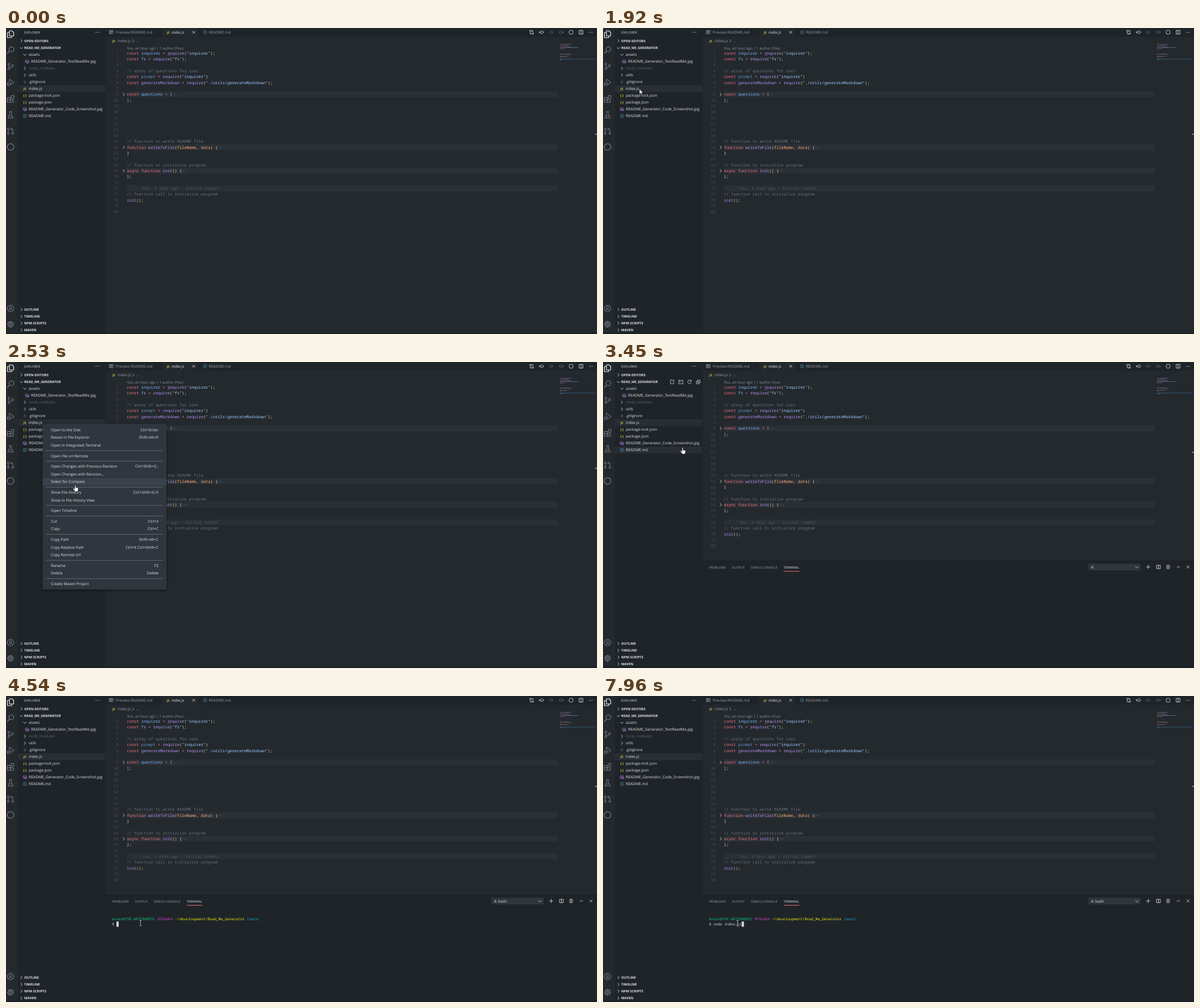
Recreate the animation shown at these times as an HTML page with a canvas. Size 1039x539 px, loop 8 s.

```html
<!DOCTYPE html>
<html lang="en">
<head>
<meta charset="utf-8">
<title>Editor session</title>
<style>
html, body { margin: 0; width: 100%; height: 100%; overflow: hidden; background: #24292e; }
canvas { display: block; width: 1039px; height: 539px; }
</style>
</head>
<body>
<canvas id="stage"></canvas>
<script>
const W = 1039, H = 539, LOOP = 8000;
const UI = '"Open Sans", "Noto Sans", sans-serif';
const MONO = '"Noto Sans Mono", "DejaVu Sans Mono", monospace';
const dpr = window.devicePixelRatio || 1;
const col = {
  bg: '#24292e', side: '#1f2428', edge: '#1b1f23', row: '#282e34', line: '#2b3036',
  text: '#e1e4e8', soft: '#d1d5da', grey: '#959da5', dim: '#6a737d', faint: '#444d56',
  menu: '#2f363d', pick: '#39424b', blue: '#519aba', yellow: '#cbcb41', purple: '#a074c4'
};
const CODE = { k: '#f97583', v: '#79b8ff', u: '#6196c4', f: '#b392f0', s: '#9ecbff',
  p: '#ffab70', b: '#e8d77a', w: '#e1e4e8', c: '#6a737d' };

let c;

function makeLayer(canvas) {
  canvas.width = W * dpr;
  canvas.height = H * dpr;
  const ctx = canvas.getContext('2d');
  ctx.scale(dpr, dpr);
  ctx.textRendering = 'geometricPrecision';
  return ctx;
}

function rect(x, y, w, h, fill) {
  c.fillStyle = fill;
  c.fillRect(x, y, w, h);
}

// y is the middle of the capitals
function text(s, x, y, fill = col.text, size = 6.7, style = '', family = UI, align = 'left') {
  c.font = `${style} ${size}px ${family}`;
  c.textAlign = align;
  c.fillStyle = fill;
  c.fillText(s, x, y + size * 0.357);
}

const mono = (s, x, y, fill, size = 7, align) => text(s, x, y, fill, size, '', MONO, align);

function icon(x, y, d, color = col.soft, w = 0.9, fill) {
  const p = new Path2D(d);
  c.save();
  c.translate(x, y);
  if (fill) { c.fillStyle = fill; c.fill(p); }
  c.strokeStyle = color;
  c.lineWidth = w;
  c.lineJoin = 'round';
  c.stroke(p);
  c.restore();
}

const ring = (x, y, r) => `M${x + r} ${y}A${r} ${r} 0 1 1 ${x - r} ${y}A${r} ${r} 0 1 1 ${x + r} ${y}`;
const right = (x, y, color = col.soft) => icon(x, y, 'M-1.3-2.6L1.4 0L-1.3 2.6', color);
const down = (x, y, color = col.soft) => icon(x, y, 'M-2.6-1.3L0 1.4L2.6-1.3', color);

function dots(x, y, color = col.soft, gap = 2.6, size = 1.1) {
  for (const i of [-1, 0, 1]) rect(x + i * gap - size / 2, y - size / 2, size, size, color);
}

function info(x, y) {
  icon(x, y, ring(0, 0, 2.9), col.blue, 0.7);
  rect(x - 0.4, y - 0.5, 0.8, 2.2, col.blue);
  rect(x - 0.4, y - 1.8, 0.8, 0.8, col.blue);
}

const js = (x, y) => text('JS', x, y, col.yellow, 5.4, 'bold', UI, 'center');
const braces = (x, y) => text('{ }', x, y - 0.3, col.yellow, 5.8, 'bold', UI, 'center');
const image = (x, y) => icon(x, y, 'M-3-2.3H1.8V1.3H-3Z M-1.5 1.3V2.6H3V-0.8H1.8 M-2.4 1L-1 -.7L.2 .5L1 0', col.purple, 0.8);
const diamond = (x, y) => icon(x, y, 'M0-2.4L2.4 0L0 2.4L-2.4 0Z M-.8 0H.8', '#59646d', 0.9);

const files = [
  ['assets', 40, down], ['README_Generator_TestReadMe.jpg', 44, image],
  ['node_modules', 40, right, '#5d666f'], ['utils', 40, right], ['.gitignore', 40, diamond],
  ['index.js', 40, js], ['package-lock.json', 40, braces], ['package.json', 40, braces],
  ['README_Generator_Code_Screenshot.jpg', 40, image], ['README.md', 40, info]
];
const ROW0 = 47, ROW = 12;

// [line number, coloured pieces]; the first letter of a piece picks its colour
const code = [
  [1, 'kconst ', 'vinquirer ', 'k= ', 'frequire', 'b(', 's"inquirer"', 'b)', 'w;'],
  [2, 'kconst ', 'vfs ', 'k= ', 'frequire', 'b(', 's"fs"', 'b)', 'w;'],
  [3],
  [4, 'c// array of questions for user'],
  [5, 'kconst ', 'uprompt ', 'k= ', 'frequire', 'b(', 's"inquirer"', 'b)'],
  [6, 'kconst ', 'fgenerateMarkdown ', 'k= ', 'frequire', 'b(', 's"./utils/generateMarkdown"', 'b)', 'w;'],
  [7],
  [8, 'kconst ', 'vquestions ', 'k= ', 's['],
  [48, 's]', 'w;'],
  [49], [50], [51], [52], [53], [54],
  [55, 'c// function to write README file'],
  [56, 'kfunction ', 'fwriteToFile', 'b(', 'pfileName', 'w, ', 'pdata', 'b) ', 'w{'],
  [62, 'w}'],
  [63],
  [64, 'c// function to initialize program'],
  [65, 'kasync function ', 'finit', 'b() ', 'w{'],
  [74, 'w};'],
  [75], [76],
  [77, 'c// function call to initialize program'],
  [78, 'finit', 'b()', 'w;'],
  [79], [80]
];
const folded = [8, 56, 65];
const CODE_X = 212.5, CODE_Y = 44.5, PITCH = 10.35, CHAR = 4.2;

function drawActivityBar() {
  const g = '#7d868f';
  icon(8, 11, 'M-2-6H2.5L5.5-3V3H-2Z M-2-3H-5.5V6H2V3', '#f2f4f6', 1.1);
  icon(8, 39, ring(1.5, -1.5, 4.2) + 'M-1.5 1.5L-5.8 6', g, 1.1);
  icon(8, 67.5, ring(-3, -4, 1.7) + ring(-3, 4.3, 1.7) + ring(3.5, -1.5, 1.7) + 'M-3-2.3V2.6M3.5 .2C3.5 2.5-1 1-2.5 2.7', g);
  icon(8, 96, 'M-2-1V-6L6 0L1 3.6' + ring(-2.5, 3, 2.4) + 'M-6 .5L-4.5 1.7M-6.4 3H-5M-6 6L-4.4 4.7M1 .5L-.4 1.7', g, 1);
  icon(8, 125, 'M-5.8-2.5H-.3V5.8H-5.8ZM-5.8 1.5H5V5.8H-.3M-.3 1.5H5M1.2-6H5.8V-1.2H1.2Z', g, 1);
  icon(8, 153, 'M-2.4-5.7H2.4M-1.4-5.7V-1.5L-4.8 5.5H4.8L1.4-1.5V-5.7M-3 2H3', g);
  icon(8, 181.5, ring(-4, -4, 1.6) + ring(-4, 4.3, 1.6) + ring(4, 4.3, 1.6) + 'M-4-2.4V2.7M4 2.7V-3.5H.3M2-5.5L0-3.5L2-1.5', g);
  icon(8, 209.5, ring(0, 0, 5.8), g, 1.1);
  icon(8, 494, ring(0, 0, 5.8) + ring(0, -1.2, 2.2) + 'M-3.8 4.3C-3 .8 3 .8 3.8 4.3', g);
  let gear = ring(0, 0, 1.9) + ring(0, 0, 4.4);
  for (let i = 0; i < 8; i++) {
    const a = i * Math.PI / 4, x = Math.cos(a), y = Math.sin(a);
    gear += `M${x * 4.4} ${y * 4.4}L${x * 6} ${y * 6}`;
  }
  icon(8, 522, gear, g, 1.1);
}

function drawSidebar() {
  rect(21, 0, 154.5, H, col.side);
  text('EXPLORER', 32, 7.5, col.soft, 5.8);
  dots(160.5, 7.5);
  const section = (s, y, mark = right) => {
    mark(27, y);
    text(s, 32, y, col.text, 5.9, 'bold');
  };
  section('OPEN EDITORS', 22.7);
  section('READ_ME_GENERATOR', 35.2, down);
  ['OUTLINE', 'TIMELINE', 'NPM SCRIPTS', 'MAVEN'].forEach((s, i) => section(s, 496 + i * 12));
}

function drawFiles(hover) {
  files.forEach(([name, x, mark, color], i) => {
    const y = ROW0 + i * ROW;
    if (i === 5 || i === hover) rect(21, y - 6, 153.5, ROW, col.row);
    mark(x - 6.8, y);
    text(name, x, y, color);
  });
}

function drawTabs() {
  rect(175.5, 0, W - 175.5, 15.5, col.side);
  rect(273.5, 0, 64.5, 15.5, col.bg);
  for (const x of [273, 338, 405]) rect(x, 0, 0.6, 15.5, col.edge);
  icon(185, 7.3, 'M-3.2-2.8H3.2V2.8H-3.2ZM0-2.8V2.8M-3.2-1H3.2M-3.2 1H0', col.grey, 0.8);
  text('Preview README.md', 193, 7.7, col.grey);
  js(285, 7.7);
  text('index.js', 291, 7.7, col.text, 6.7, 'italic');
  icon(330, 7.5, 'M-2.2-2.2L2.2 2.2M2.2-2.2L-2.2 2.2', col.text);
  info(350, 7.5);
  text('README.md', 356.5, 7.7, col.grey);

  icon(924, 7.5, ring(-2.5, -2.6, 1.1) + ring(2.5, 2.6, 1.1) + 'M-2.5-1.4V2.6H.5M-1-3.5M2.5 1.4V-2.6H-.5M1-4L-.5-2.6L1-1.2M-1 1.2L.5 2.6L-1 4', col.soft, 0.8);
  icon(941.5, 7.5, ring(0.8, 0, 2.3) + 'M-1.5 0H-4.2M-2.4-2L-4.3 0L-2.4 2M3.1 0H4.3', col.soft, 0.8);
  icon(958.5, 7.5, ring(0, 0, 2.2) + 'M-4.2 0H-2.2M2.2 0H4.2', '#606971', 0.8);
  icon(976, 7.5, ring(-0.8, 0, 2.3) + 'M1.5 0H4.2M2.4-2L4.3 0L2.4 2M-3.1 0H-4.3', '#606971', 0.8);
  icon(993.5, 7.5, ring(0, 0, 3.6), col.soft);
  icon(1011, 7.5, 'M-3.3-3.3H3.3V3.3H-3.3ZM0-3.3V3.3', col.soft);
  dots(1028.5, 7.7);

  js(189.5, 23);
  text('index.js', 196, 23, col.grey);
  right(223.5, 23, col.grey);
  text('...', 228.5, 23, col.grey);
}

function drawCode() {
  text('You, an hour ago | 1 author (You)', CODE_X, 36, '#8b949c', 6.4);
  code.forEach(([num, ...parts], i) => {
    const y = CODE_Y + i * PITCH, my = 28.6 + i * 1.08;
    const isFold = folded.includes(num);
    if (isFold || num === 76) rect(CODE_X, y - 5.2, 757.5, PITCH, col.line);
    mono(String(num), 198, y, col.faint, 7, 'right');
    if (isFold) right(207, y);
    let n = 0;
    for (const part of parts) {
      const s = part.slice(1), color = CODE[part[0]];
      mono(s, CODE_X + n * CHAR, y, color);
      c.globalAlpha = 0.5;
      rect(974 + n * 0.54, my, s.trimEnd().length * 0.54, 0.75, color);
      c.globalAlpha = 1;
      n += s.length;
    }
    if (isFold) dots(CODE_X + n * CHAR + 4.8, y + 0.4, '#7b848d', 2.4, 0.9);
    if (num === 76) mono('You, 3 days ago \u2022 initial commit', 239.7, y, '#50585f');
  });
  dots(286.5, 48.6, col.grey, 2, 0.8);
  rect(974, 54.2, 62, 0.9, '#31567a');
}

function drawPanel(ready, typed) {
  rect(175.5, 350.5, W - 175.5, 186.5, col.side);
  rect(175.5, 350, W - 175.5, 0.7, col.edge);
  [['PROBLEMS', 186.5], ['OUTPUT', 226.5], ['DEBUG CONSOLE', 260], ['TERMINAL', 317.5]].forEach(([s, x], i) =>
    text(s, x, 361.5, i === 3 ? col.text : col.grey, 5.7));
  rect(317.5, 368.3, 28, 0.9, '#f97583');
  rect(853.5, 355.3, 91.5, 11.7, col.menu);
  text(ready ? '4: bash' : '4:', 858, 361.4);
  down(938.5, 361.5);
  icon(958.5, 361, 'M-3.6 0H3.6M0-3.6V3.6');
  icon(976.5, 361, 'M-3.3-3H3.3V3H-3.3ZM0-3V3');
  icon(993.5, 361, 'M-3-2.2H3M-1-2.2V-3.3H1V-2.2M-2.3-2.2V3.2H2.3V-2.2M-.8-.8V2M.8-.8V2', '#d9b9c2', 0.8);
  icon(1011.5, 361, 'M-2.6 1.3L0-1.4L2.6 1.3');
  icon(1028.5, 361, 'M-2.4-2.4L2.4 2.4M2.4-2.4L-2.4 2.4');
  if (!ready) return;

  const x0 = 186.5, cw = 3.82, size = cw / 0.6;
  let n = 0;
  for (const [s, color] of [['mvarn@THE-WATERWHEEL ', '#0dbc79'], ['MINGW64 ', '#bc3fbc'],
    ['~/develoupment/Read_Me_Generator ', '#e5e510'], ['(main)', '#11a8cd']]) {
    mono(s, x0 + n * cw, 392.3, color, size);
    n += s.length;
  }
  mono('$ ' + typed, x0, 401.6, col.soft, size);
  rect(x0 + (2 + typed.length) * cw, 397.2, 4, 9.3, '#d1d5da');
}

function drawHeaderActions() {
  icon(121.5, 35, 'M.5-3.4H-2.8V3.4H2.8V-.5M.8-2.2H4M2.4-3.8V-.6', col.soft, 0.8);
  icon(137, 35, 'M.5-2.3H-.8L-1.6-3H-3.8V3.2H3.6V-.4M-3.8-1H.5M1.2-2.2H4.2M2.7-3.8V-.7', col.soft, 0.8);
  icon(152, 35, 'M2.8-1.6A3.1 3.1 0 1 0 3.1.8M3.2-3.6V-1.4H.9', col.soft, 0.9);
  icon(167.5, 35, 'M-3.4-.9H1.2V3.4H-3.4ZM-1.6-.9V-3.2H3.4V1.6H1.2M-2.2 1.3H0', col.soft, 0.8);
}

const menuGroups = [
  [['Open to the Side', 'Ctrl+Enter'], ['Reveal in File Explorer', 'Shift+Alt+R'], ['Open in Integrated Terminal']],
  [['Open File on Remote']],
  [['Open Changes with Previous Revision', 'Ctrl+Shift+G ,'], ['Open Changes with Revision...'], ['Select for Compare']],
  [['Show File History', 'Ctrl+Shift+G H'], ['Show in File History View']],
  [['Open Timeline']],
  [['Cut', 'Ctrl+X'], ['Copy', 'Ctrl+C']],
  [['Copy Path', 'Shift+Alt+C'], ['Copy Relative Path', 'Ctrl+K Ctrl+Shift+C'], ['Copy Remote Url']],
  [['Rename', 'F2'], ['Delete', 'Delete']],
  [['Create Maven Project']]
];

function drawMenu(my) {
  c.save();
  c.shadowColor = 'rgba(0,0,0,.6)';
  c.shadowBlur = 5 * dpr;
  c.shadowOffsetY = dpr;
  rect(64.5, 108.8, 217.5, 292, col.menu);
  c.restore();
  let y = 119.5;
  menuGroups.forEach((group, g) => {
    if (g) {
      rect(70, y - 9.6, 206, 0.8, '#6b7178');
    }
    for (const [label, keys] of group) {
      if (Math.abs(my - y) < 6.8) rect(64.5, y - 6.5, 217.5, 13, col.pick);
      text(label, 79, y);
      if (keys) text(keys, 268, y, col.text, 6.7, '', UI, 'right');
      y += 13.6;
    }
    y += 5;
  });
}

const ease = {
  line: u => u,
  both: u => u * u * (3 - 2 * u),
  out: u => 1 - (1 - u) ** 2.2
};
// [tick, x, y, easing towards this point]
const path = [
  [1, 985, 535], [11, 82, 165, 'out'], [22, 64, 107.5, 'both'], [28, 64, 107.5, 'line'],
  [33, 122, 217, 'both'], [35, 131, 239, 'out'], [39, 140, 161.5, 'both'], [43, 140, 151, 'both'],
  [46, 140, 151, 'line'], [55, 237.3, 400, 'both'], [56, 236.5, 400, 'line']
];

function pointerAt(k) {
  const i = path.findIndex(p => p[0] >= k);
  if (i < 0) return path[path.length - 1].slice(1, 3);
  if (i === 0) return path[0].slice(1, 3);
  const a = path[i - 1], b = path[i];
  const u = ease[b[3]]((k - a[0]) / (b[0] - a[0]));
  return [a[1] + (b[1] - a[1]) * u, a[2] + (b[2] - a[2]) * u];
}

const pointers = {
  arrow: (x, y) => icon(x, y, 'M0 0V9L2.1 7.1L3.6 10.4L5.1 9.7L3.6 6.5H6.4Z', '#15181b', 0.6, '#fff'),
  hand: (x, y) => icon(x, y, 'M-1 .8C-1-.3.7-.3.7.8V4L4 4.7C5 5 5.2 5.5 5.1 6.3L4.4 9V11H-1.4V9.4L-4 6.6C-4.3 5.5-3 5-2.3 5.7L-1 7Z', '#15181b', 0.5, '#fff'),
  beam: (x, y) => icon(x, y, 'M-2-4.7H-.6L0-4.2L.6-4.7H2M0-4.2V4.2M-2 4.7H-.6L0 4.2L.6 4.7H2', '#c9cdd2', 0.8)
};

const keyTimes = [5400, 5550, 5700, 5870, 6020, 6250, 6420, 6495, 6570, 6950, 7180, 7810, 7960];
const command = 'node index.js';

function render(t) {
  const k = Math.floor((t + 8) / 76.8);
  const [x, y] = pointerAt(k);
  const menu = k >= 26 && k < 45, panel = k >= 45;
  const shown = k >= 1, free = shown && (k < 25 || panel);
  const inSide = free && x > 21 && x < 175;
  const overRow = inSide && y >= 41 && y < 161;

  c.drawImage(base, 0, 0, W, H);
  drawFiles(overRow ? Math.floor((y - 41) / ROW) : -1);
  if (inSide) drawHeaderActions();
  rect(1035.5, panel ? 158.6 : 186.6, 3.5, 1.2, '#b9bec4');
  if (panel) drawPanel(k >= 50, command.slice(0, keyTimes.filter(v => v <= t).length));
  if (menu) drawMenu(y);
  if (!shown) return;

  const inCode = x > 206 && x < 970 && y > 31 && (!panel || y < 350);
  const inTerm = panel && x > 180 && y > 375;
  const kind = overRow || (menu && y > 112) ? 'hand' : inCode || inTerm ? 'beam' : 'arrow';
  pointers[kind](x, y);
}

const base = document.createElement('canvas');
c = makeLayer(base);
rect(0, 0, W, H, col.bg);
drawActivityBar();
drawSidebar();
drawTabs();
drawCode();
rect(0, 537, W, 2, col.edge);

c = makeLayer(document.getElementById('stage'));
const start = performance.now();
function tick() {
  render((performance.now() - start) % LOOP);
  requestAnimationFrame(tick);
}
tick();
</script>
</body>
</html>
```
